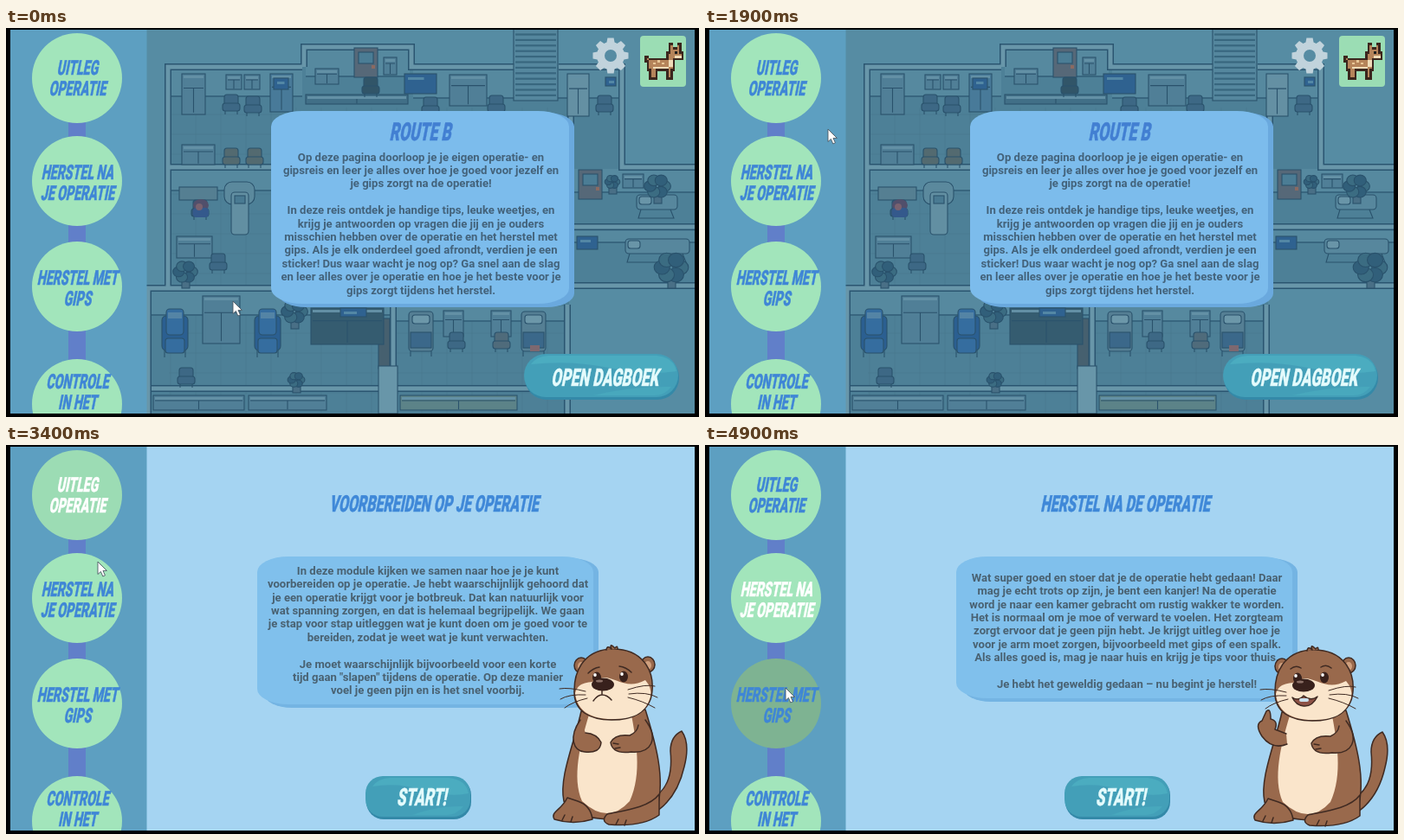
An HTML page that plays this animation: 800 by 450 pixels, repeating every 5000 ms.

```html
<!DOCTYPE html>
<html lang="nl">
<head>
<meta charset="utf-8">
<style>
html, body { margin: 0; width: 100%; height: 100%; overflow: hidden; background: #000; }
svg { display: block; width: 100vw; height: 100vh; }
text { text-anchor: middle; }
.title { font: 900 1px Roboto, "Open Sans", sans-serif; stroke: currentColor; stroke-width: .5; }
.body { font: 700 13.1px Roboto, "Open Sans", sans-serif; }
.ink { stroke: #3f2a22; stroke-width: 1.5; stroke-linejoin: round; stroke-linecap: round; }
.room { stroke: #2a526c; stroke-width: 1.1; }
</style>
</head>
<body>
<svg id="stage" viewBox="0 0 800 450"></svg>
<script>
const LOOP = 5000, FADE = 100;
const BLUE = '#3f86d6', GREEN = [162, 229, 187];
// Press and release time of each sidebar button; the last one is held to the end
const clicks = [[2430, 2530], [3540, 3640], [4780, LOOP]];

const rect = (x, y, w, h, fill, more = '') =>
  `<rect x="${x}" y="${y}" width="${w}" height="${h}" fill="${fill}" ${more}/>`;
const oval = (x, y, rx, ry, fill, more = '') =>
  `<ellipse cx="${x}" cy="${y}" rx="${rx}" ry="${ry}" fill="${fill}" ${more}/>`;
const path = (d, fill, more = '') => `<path d="${d}" fill="${fill}" ${more}/>`;
const each = (list, draw) => list.map(a => draw(...a)).join('');

// Display lettering: one narrow, slanted style for every heading
const title = (x, y, size, words, color = BLUE) =>
  `<text class="title" fill="currentColor" style="font-size:${size}px;color:${color}"
    transform="translate(${x - 2} ${y}) skewX(-11) scale(.6 1)">${words}</text>`;
const lines = (x, y, fill, copy) => copy.trim().split('\n').map((s, i) =>
  `<text class="body" x="${x}" y="${y + i * 15.4}" fill="${fill}">${s.trim()}</text>`).join('');

const panel = (x, y, w, h, fill, edge) =>
  rect(x + 8, y + 2, w - 8, h, edge, 'rx="32" ry="16"') +
  rect(x, y, w - 6, h - 2, fill, 'rx="36" ry="18"');

const button = (x, y, w, h, r, label) =>
  rect(x + 1, y + 2, w, h, '#3489a8', `rx="${r}"`) +
  rect(x, y, w, h - 1, '#439fb8', `rx="${r}"`) +
  path(`M${x + 8} ${y + 12}Q${x + 14} ${y + 3} ${x + 28} ${y + 2}H${x + w - 25}
    Q${x + w - 5} ${y + 4} ${x + w - 2} ${y + 20}Q${x + w * .8} ${y + 25} ${x + w * .55} ${y + 16}
    T${x + 8} ${y + 12}Z`, '#4bacc0') +
  path(`M${x + w * .45} ${y + h - 3}Q${x + w * .7} ${y + h - 14} ${x + w - 8} ${y + h - 13}
    Q${x + w - 16} ${y + h - 3} ${x + w - 28} ${y + h - 3}Z`, '#48a8bd') +
  title(x + w / 2 + 6, y + h - 14.5, 28, label, '#e4fbfc');

// Hospital furniture
const ROOM = 'class="room"';
const unit = (x, y, w, h, fill = '#507f97') => rect(x, y, w, h, fill, ROOM) +
  path(`M${x + 2} ${y + h * .35}h${w - 4}M${x + w / 2} ${y + h * .35}v${h * .6}`, 'none', ROOM) +
  rect(x + 2, y + 2, w - 4, 3, '#6390a5');
const chair = (x, y, fill = '#3d6885') => rect(x + 2, y, 16, 13, fill, ROOM + ' rx="3"') +
  rect(x, y + 10, 20, 9, fill, ROOM + ' rx="3"') + path(`M${x + 3} ${y + 19}v4m14 0v-4`, 'none', ROOM);
const recliner = (x, y) => rect(x, y + 8, 30, 40, '#2b5f91', ROOM + ' rx="5"') +
  rect(x + 5, y, 20, 30, '#356d9f', ROOM + ' rx="4"') + rect(x + 7, y + 4, 16, 7, '#5484a5') +
  rect(x + 4, y + 34, 22, 17, '#356d9f', ROOM + ' rx="3"') + path(`M${x + 3} ${y + 48}v8m24 0v-8`, 'none', ROOM);
const bed = (x, y) => rect(x, y, 28, 46, '#557f94', ROOM + ' rx="4"') +
  rect(x + 4, y + 4, 20, 10, '#6c97a9', ROOM + ' rx="3"') + rect(x + 2, y + 24, 24, 18, '#3b688a', ROOM) +
  path(`M${x + 2} ${y + 46}v6m24 0v-6`, 'none', ROOM);
const couch = (x, y, w) => rect(x, y, w, 17, '#57879d', ROOM + ' rx="4"') +
  rect(x + 3, y + 2, 14, 9, '#6995a8', ROOM + ' rx="3"') + path(`M${x + 5} ${y + 17}l-3 10h${w - 6}l-4 -10`, 'none', ROOM);
const plant = (x, y, r) => rect(x - 4, y + r - 3, 9, 9, '#496f86', ROOM) +
  [0, 1, 2, 3, 4, 5].map(i => oval(x + r * .6 * Math.cos(i * 1.05), y + r * .55 * Math.sin(i * 1.05),
    r * .5, r * .45, i % 2 ? '#315f7a' : '#3b6c82', ROOM)).join('');
const door = (x, y) => rect(x, y, 27, 34, '#566878', ROOM) + rect(x + 5, y + 5, 17, 13, '#4b7d95', ROOM) +
  rect(x + 20, y + 20, 4, 4, '#8a6a62');

const walls = d => path(d, 'none', 'stroke="#2a5570" stroke-width="8" stroke-linejoin="miter"') +
  path(d, 'none', 'stroke="#6896a9" stroke-width="5" stroke-linejoin="miter"');

const hospital =
  rect(162, 0, 633, 446, '#568ca3') +
  path('M188 45H344V22H468V45H711V161H795V300H650V446H165V301H188Z', '#4d8097') +
  '<g stroke="#45758c" stroke-width=".7" opacity=".65">' +
  Array.from({ length: 16 }, (_, i) => `<path d="M${190 + i * 29} 92V446M188 ${100 + i * 23}H650"/>`).join('') + '</g>' +
  each([[190, 48, 152, 30], [346, 25, 120, 30], [470, 48, 238, 32], [190, 163, 120, 24],
    [652, 163, 143, 26], [652, 235, 143, 12], [168, 304, 277, 27], [450, 322, 196, 16]],
    (x, y, w, h) => rect(x, y, w, h, '#56899f') + rect(x, y + h, w, 2, '#38667f')) +
  walls('M342 45H187V300M344 45V22H468V45H586M638 45H711V161H795M187 161H310M164 446V301H310M652 161V96M652 230H795M652 298H795M447 446V322M648 320V446M168 417H430M452 417H648') +
  rect(586, 0, 51, 84, '#55879e', ROOM) +
  Array.from({ length: 13 }, (_, i) => rect(588, i * 6.4, 47, 2.2, '#38677f')).join('') +
  door(402, 23) + door(661, 164) + rect(430, 336, 13, 58, '#46606f', ROOM) +
  each([[203, 53, 27, 47], [305, 53, 26, 44, '#487a99'], [254, 54, 18, 17], [275, 54, 18, 17], [203, 135, 38, 23],
    [357, 47, 27, 18], [346, 77, 118, 11, '#416f87'], [512, 54, 43, 36], [648, 53, 25, 49, '#6490a3'], [436, 34, 15, 20]], unit) +
  each([[197, 241, 41, 25], [227, 310, 43, 55], [352, 324, 84, 42, '#355c70'], [505, 327, 23, 30],
    [560, 327, 23, 30], [170, 425, 105, 17], [280, 425, 90, 17], [455, 425, 135, 17, '#5c8388'], [712, 169, 24, 16]], unit) +
  each([[460, 53, 37, 23], [659, 241, 24, 15], [309, 58, 17, 13], [386, 324, 30, 10], [692, 57, 12, 10]],
    (x, y, w, h) => rect(x, y, w, h, '#2f6290', ROOM) + rect(x + 4, y + 4, w / 2, 3, '#5387a5')) +
  each([[250, 77], [275, 79], [411, 57, '#315568'], [480, 80], [556, 78], [681, 78]], chair) +
  each([[250, 139, '#536a70'], [277, 139, '#536a70'], [235, 261], [198, 393], [510, 352], [562, 352, '#4f6b7b']], chair) +
  each([[180, 325], [287, 325]], recliner) + each([[465, 328], [595, 328]], bed) +
  rect(252, 178, 35, 26, '#5b899d', ROOM + ' rx="9"') + rect(260, 190, 20, 49, '#628fa2', ROOM + ' rx="4"') +
  rect(264, 194, 12, 9, '#497a92', ROOM) +
  rect(200, 184, 44, 15, '#557f92', ROOM) + chair(214, 199, '#34587a') +
  oval(225, 205, 9, 7, '#514f6b') + rect(216, 208, 18, 11, '#34598c', 'rx="4"') + oval(223, 207, 4, 4, '#79616f') +
  couch(728, 193, 47) + couch(715, 244, 74) +
  each([[207, 282, 13], [333, 328, 14], [752, 183, 14], [768, 277, 18], [335, 407, 9], [700, 178, 8]], plant) +
  rect(430, 391, 22, 55, '#6896a9', ROOM) + rect(605, 367, 11, 7, '#7d6870');

const gear = `<g transform="translate(698 32)" fill="#c1d3dc">` +
  Array.from({ length: 8 }, (_, i) => `<path d="M-5 -13L-3.6 -20.5H3.6L5 -13Z" transform="rotate(${i * 45})"/>`).join('') +
  '<circle r="11.5" fill="none" stroke="#c1d3dc" stroke-width="9"/></g>';

// Pixel deer, drawn on a 2.5px lattice
const deer = rect(732, 9, 53, 59, '#9bddb4', 'rx="4"') +
  '<g transform="translate(737 17) scale(2.5)" shape-rendering="crispEdges">' +
  path('M0 6h2v1h8V4h1V0h2v2h2V0h2v4h1v4h-4v5h-1v4h-3v-4H6v4H2V13H1V9H0Z', '#3b261d') +
  path('M1 7h1v1h9V5h1V1h1v2h2V1h1v4h1v2h-4v5h-1v4h-1v-4H5v4H3v-4H2V8H1Z', '#b5845a') +
  path('M4 11h7v1H4ZM11 8h2v3h-2ZM14 6h3v1h-3Z', '#efdcb8') +
  path('M4 9h1v1h-1ZM6 8h1v1h-1ZM8 9h1v1h-1Z', '#e8c797') + rect(14, 4, 1, 1, '#20201f') + '</g>';

const route = hospital + gear + deer +
  panel(306, 96, 350, 225, '#7cbcec', '#6aa9de') + title(480, 130, 29, 'ROUTE B', '#427fd2') +
  lines(479, 153.6, '#43627a', `Op deze pagina doorloop je je eigen operatie- en
    gipsreis en leer je alles over hoe je goed voor jezelf en
    je gips zorgt na de operatie!

    In deze reis ontdek je handige tips, leuke weetjes, en
    krijg je antwoorden op vragen die jij en je ouders
    misschien hebben over de operatie en het herstel met
    gips. Als je elk onderdeel goed afrondt, verdien je een
    sticker! Dus waar wacht je nog op? Ga snel aan de slag
    en leer alles over je operatie en hoe je het beste voor je
    gips zorgt tijdens het herstel.`) +
  button(598, 377, 178, 51, 25, 'OPEN DAGBOEK');

function otter(happy) {
  const FUR = '#99694c', CREAM = '#fae5cb', DARK = '#38211c', INK = 'class="ink"';
  const arm = happy
    ? 'M670 345Q653 352 641 336Q632 322 641 318L646 307Q651 302 651 316Q660 318 656 328L669 333'
    : 'M663 318C649 338 655 354 668 355Q686 357 687 344Q682 334 669 333';
  const mouth = happy
    ? path('M676 291Q683 296 689 289Q697 296 705 290Q699 302 689 301Q680 300 676 291Z', '#8d5145', INK) +
      rect(684, 292, 11, 4, '#cbe0ed', 'rx="2"')
    : path('M678 296Q683 289 688 289Q694 289 699 295M688 284V289', 'none', INK);
  const brows = happy ? 'M674 258Q680 253 686 257M709 256Q715 252 721 257'
    : 'M672 264Q678 258 685 257M708 256Q716 257 722 263';
  return `<g transform="translate(${happy ? '2 1' : '0 0'})">` +
    path('M740 412C768 400 769 374 767 354Q767 337 780 331Q790 345 783 372Q774 412 744 428Z', FUR, INK) +
    path('M664 308C656 345 638 385 644 412C650 438 740 440 752 418C761 385 750 345 738 306Z', FUR, INK) +
    path('M673 312C663 345 653 385 665 412Q695 440 720 412C735 380 727 340 722 312Z', CREAM) +
    path('M648 408C641 423 628 424 633 433Q655 440 677 433Q675 417 660 412Z', FUR, INK) +
    path('M754 404C742 420 712 423 694 427Q686 435 696 439Q735 442 754 428Z', FUR, INK) +
    path('M642 434l3 -6M652 436l2 -6M704 439l3 -6M714 440l2 -6', 'none', INK) +
    path(arm, FUR, INK) +
    path('M738 318C754 340 745 357 722 355Q700 358 698 344Q703 334 720 336Q729 332 730 324', FUR, INK) +
    path('M701 345l6 1M703 351l6 -1', 'none', INK) +
    oval(664, 255, 8, 9, FUR, INK) + oval(741, 254, 8, 9, FUR, INK) +
    oval(664, 256, 4, 5, '#d0a07e') + oval(741, 255, 4, 5, '#d0a07e') +
    path('M701 236C734 236 748 260 746 284C744 310 722 318 699 318C674 318 655 308 656 284C656 258 670 236 701 236Z', FUR, INK) +
    path('M657 287C662 270 677 278 689 269C704 268 716 284 738 272Q746 281 744 291C738 312 722 317 699 317C676 317 659 308 657 287Z', CREAM) +
    path('M693 237Q694 231 699 236Q696 228 703 235Q706 231 706 236', FUR, INK) +
    oval(682, 269, 5, 6.5, DARK) + oval(713, 268, 5, 6.5, DARK) +
    oval(680, 266, 1.8, 2, '#fff') + oval(711, 265, 1.8, 2, '#fff') +
    path(brows, 'none', INK) + oval(689, 277, 13, 7.5, DARK) + oval(685, 273, 4, 1.5, '#8b7067') + mouth +
    path('M669 285Q650 280 639 282M669 289Q650 288 640 294M671 293Q654 297 645 304M718 283Q739 276 749 279M719 288Q740 285 752 292M718 292Q735 296 749 304',
      'none', 'class="ink" style="stroke-width:1"') + '</g>';
}

const module = (name, height, y, copy, happy) => rect(162, 0, 633, 446, '#a5d4f2') +
  panel(290, 129, 394, height, '#80c0ec', '#74b4e3') + title(happy ? 487 : 496, 77, 26.5, name, '#3f88d8') +
  lines(487, y, '#496171', copy) + button(415, 383, 121, 48, 20, 'START!') + otter(happy);

const prep = module('VOORBEREIDEN OP JE OPERATIE', 173, 149.8, `In deze module kijken we samen naar hoe je je kunt
  voorbereiden op je operatie. Je hebt waarschijnlijk gehoord dat
  je een operatie krijgt voor je botbreuk. Dat kan natuurlijk voor
  wat spanning zorgen, en dat is helemaal begrijpelijk. We gaan
  je stap voor stap uitleggen wat je kunt doen om je goed voor te
  bereiden, zodat je weet wat je kunt verwachten.

  Je moet waarschijnlijk bijvoorbeeld voor een korte
  tijd gaan "slapen" tijdens de operatie. Op deze manier
  voel je geen pijn en is het snel voorbij.`, false);

const after = module('HERSTEL NA DE OPERATIE', 166, 157.8, `Wat super goed en stoer dat je de operatie hebt gedaan! Daar
  mag je echt trots op zijn, je bent een kanjer! Na de operatie
  word je naar een kamer gebracht om rustig wakker te worden.
  Het is normaal om je moe of verward te voelen. Het zorgteam
  zorgt ervoor dat je geen pijn hebt. Je krijgt uitleg over hoe je
  voor je arm moet zorgen, bijvoorbeeld met gips of een spalk.
  Als alles goed is, mag je naar huis en krijg je tips voor thuis.

  Je hebt het geweldig gedaan – nu begint je herstel!`, true);

const steps = [[58, 54, 'UITLEG', 'OPERATIE'], [177, 175, 'HERSTEL NA', 'JE OPERATIE'],
  [299, 297, 'HERSTEL MET', 'GIPS'], [435, 417, 'CONTROLE', 'IN HET']];
const sidebar = rect(5, 0, 157.5, 446, '#5d9fc1') + rect(72, 58, 20, 388, '#617fc9') +
  each(steps, (y, base, a, b) => `<g class="step"><circle cx="82" cy="${y}" r="52"/>` +
    title(84.3, base, 23.5, a, 'inherit') + title(84.3, base + 23.5, 23.5, b, 'inherit') + '</g>');

const stage = document.getElementById('stage');
stage.innerHTML = '<clipPath id="view"><path d="M5 2H795V446H5Z"/></clipPath><g clip-path="url(#view)">' +
  [route, prep, after].map(s => `<g class="scene">${s}</g>`).join('') + sidebar + '</g>' +
  path('M0 0V14.5L3.4 11.4L5.8 17L8.4 15.8L6 10.4H10.4Z', '#fff', 'id="cursor" stroke="#4b5863" stroke-width=".9"');

const scenes = [...stage.querySelectorAll('.scene')];
const buttons = [...stage.querySelectorAll('.step')];
const cursor = document.getElementById('cursor');

// Pointer stops: time, x, y
const stops = [[0, 262, 316], [800, 262, 314], [900, 262, 314], [1900, 142, 117], [2400, 99, 84],
  [2750, 99, 84], [3400, 106, 135], [3600, 101, 166], [3850, 101, 166], [4750, 93, 281], [LOOP, 93, 281]];

function pointer(t) {
  const i = stops.findIndex(s => s[0] > t);
  const [t0, x0, y0] = stops[i - 1], [t1, x1, y1] = stops[i];
  const u = (t - t0) / (t1 - t0), e = u * u * (3 - 2 * u);
  return [x0 + (x1 - x0) * e, y0 + (y1 - y0) * e];
}

const ramp = (t, start) => Math.min(1, Math.max(0, (t - start) / FADE));

// Brightness of a button: slightly dim when hovered or selected, darker while pressed
function shade(i, t, over) {
  const [press, release] = clicks[i] || [LOOP, LOOP];
  const next = clicks[i + 1] ? clicks[i + 1][0] : LOOP;
  const selected = ramp(t, press) - ramp(t, next);
  return 1 - .04 * Math.max(over, selected) - .18 * (ramp(t, press) - ramp(t, release));
}

function draw(now) {
  const t = now % LOOP, [x, y] = pointer(t);
  const scene = clicks.filter(c => t >= c[1]).length;
  scenes.forEach((g, i) => g.style.display = i === scene ? '' : 'none');
  buttons.forEach((g, i) => {
    const k = shade(i, t, Math.hypot(x - 82, y - steps[i][0]) < 47 ? 1 : 0);
    g.firstChild.style.fill = `rgb(${GREEN.map(c => Math.round(c * k))})`;
    g.style.color = i === scene - 1 ? '#fff' : BLUE;
  });
  cursor.setAttribute('transform', `translate(${x} ${y})`);
}

function tick() {
  draw(performance.now());
  requestAnimationFrame(tick);
}
tick();
</script>
</body>
</html>
```
